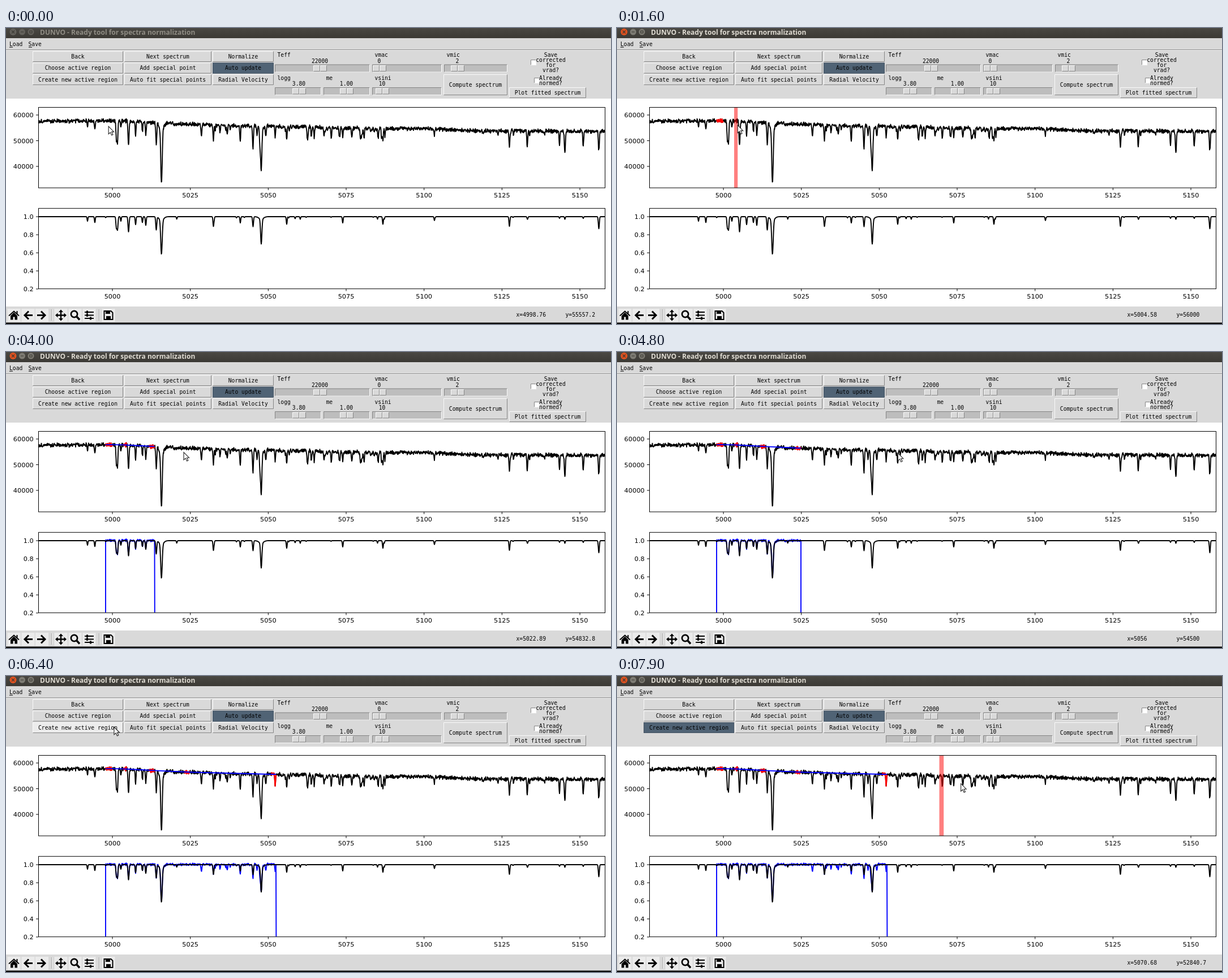
An HTML page that plays this animation: 1069 by 524 pixels, repeating every 8000 ms.

```html
<!DOCTYPE html>
<html lang="en">
<head>
<meta charset="utf-8">
<title>Spectra normalization</title>
<style>
html, body { margin: 0; width: 100%; height: 100%; overflow: hidden; background: #fff; }
svg { display: block; width: 100vw; height: 100vh; }
text { font: 9.7px "DejaVu Sans Mono", monospace; fill: #000; white-space: pre; }
.tick { font: 11.3px "DejaVu Sans", sans-serif; }
.title { font: bold 12px "Open Sans", sans-serif; fill: #dfdbd2; }
.line { fill: none; stroke: #000; stroke-width: 1.9; stroke-linejoin: round; }
.blue { stroke: #00f; }
.red { stroke: #f00; stroke-width: 2.2; }
.axis { fill: none; stroke: #000; stroke-width: 1; }
.knob { fill: #7d7b73; }
.close { fill: #e2521f; }
.idle .title { fill: #8f8c84; }
.idle .knob { fill: #63615b; }
.face { fill: #d9d9d9; }
.lit, .dim { fill: none; stroke: #fafafa; }
.dim { stroke: #858585; }
.over .face { fill: #ececec; }
.on .face { fill: #506375; }
.on .lit, .on .dim { stroke: #445464; }
</style>
</head>
<body>
<svg id="stage" viewBox="0 0 1069 524" preserveAspectRatio="none"></svg>
<script>
const LOOP = 8000, STEP = 100;

// Linear interpolation through rows [at, a, b, ...]; returns column col.
function mix(rows, at, col = 1) {
  if (at <= rows[0][0]) return rows[0][col];
  for (let i = 1; i < rows.length; i++) {
    const p = rows[i - 1], q = rows[i];
    if (at <= q[0]) return p[col] + (q[col] - p[col]) * (at - p[0]) / (q[0] - p[0]);
  }
  return rows[rows.length - 1][col];
}

let seed = 20177;
function rand() {
  seed = (seed * 1664525 + 1013904223) % 4294967296;
  return seed / 4294967296;
}

// ---- data scales
const waveX = w => 188 + (w - 5000) * 5.507;
const fluxY = f => 154 + (60000 - f) * 0.00455;
const normY = n => 334 + (1 - n) * 160;
const RATIO = 0.61; // lower plot height per upper plot height

// ---- spectra in pixels
const continuum = [[57, 165], [200, 164], [300, 169.3], [400, 172.8], [500, 174.5],
  [650, 178], [750, 178.3], [830, 182], [1059, 183]];
const level = x => mix(continuum, x);

// Strong lines: position, depth.
const strong = [
  [144, 13], [157, 17], [195, 32], [197, 38], [203, 13], [216.5, 44], [229, 23], [241, 17], [247, 25],
  [265.5, 38], [274.7, 98], [366.5, 28], [414, 18], [436.5, 29], [451, 72], [496, 22], [595, 18],
  [666, 22], [757, 11], [889.5, 28], [921, 26], [978, 25], [987.5, 39], [1020, 26], [1047.5, 35]];
// The model hardly shows the lines in this gap.
const modelled = strong.map(([x, d]) => [x, d * (x > 900 && x < 1040 ? 0.12 : RATIO)]);

function weak(n, from, to, depth) {
  return Array.from({ length: n }, () => [from + rand() * (to - from), depth * (0.2 + 0.8 * rand() ** 2)]);
}
const observedLines = [...strong, ...weak(42, 325, 680, 21), ...weak(8, 800, 980, 12)];
const modelLines = [...modelled, ...weak(18, 100, 1000, 5)];

const bell = (d, s) => Math.exp(-d * d / (2 * s * s));
function absorb(lines, x, widen, deep) {
  let sum = 0;
  for (const [at, depth] of lines) {
    const d = x - at;
    sum += depth * bell(d, 0.6 + depth * widen);
    if (depth > deep) sum += depth * 0.1 * bell(d, 4);
  }
  return sum;
}

const observed = [], model = [];
for (let x = 57.5; x <= 1058.5; x += 0.5) {
  const noise = (rand() + rand() - 1) * 4.2;
  observed.push([x, level(x) + noise + absorb(observedLines, x, 0.007, 60)]);
  model.push([x, 334 + absorb(modelLines, x, 0.012, 40)]);
}
const path = pts => pts.length ? 'M' + pts.map(p => p[0].toFixed(2) + ' ' + p[1].toFixed(2)).join('L') : '';
const slice = (a, b) => observed.filter(p => p[0] >= a && p[0] <= b);

// ---- regions dragged out with the pointer
const regions = [
  [400, 900, 1200, 4997.82, 4999.96, 56281.6],
  [1400, 1600, 1800, 5003.45, 5004.58, 56000],
  [3400, 3700, 3800, 5011.62, 5013.58, 55300],
  [4200, 4500, 4600, 5022.89, 5024.88, 54600],
  [5300, 5800, 5900, 5050.99, 5052.55, 53565.1],
  [7500, 7700, Infinity, 5069.28, 5070.68, 52840.7]
].map(([start, end, release, from, to, flux]) =>
  ({ start, end, release, from, to, flux, left: waveX(from), right: waveX(to) }));

// Pointer stops between the drags: time, wavelength, flux.
const stops = [
  [0, 4998.76, 55557.2], [2000, 5004.58, 56000], [2400, 5011.2, 55738.3], [3200, 5011.2, 55738.3],
  [4000, 5022.89, 54832.8], [4800, 5056, 54500], [5100, 5051, 53565.1], [6100, 5027.6, 66200],
  [6400, 5000.54, 74000], [6600, 5000.54, 74000], [7000, 5058.6, 53300], [7100, 5058.6, 53300],
  [7900, 5076.2, 51980]];
const moves = stops.concat(regions.flatMap(r =>
  [[r.start, r.from, r.flux], [r.end, r.to, r.flux], [r.release, r.to, r.flux]]))
  .filter(m => m[0] < LOOP).sort((a, b) => a[0] - b[0]);
const STUCK = 7700; // the readout freezes here
const CLICK = 6600;

// ---- static markup
const text = (x, y, s, anchor = 'middle', cls = '') =>
  `<text x="${x}" y="${y}" text-anchor="${anchor}" class="${cls}">${s}</text>`;
const rect = (x, y, w, h, fill, more = '') =>
  `<rect x="${x}" y="${y}" width="${w}" height="${h}" fill="${fill}" ${more}/>`;
const draw = (d, w, colour = '#000') => `<path d="${d}" fill="none" stroke="${colour}" stroke-width="${w}"/>`;
const fill = d => `<path d="${d}"/>`;

// Box with a light and a dark edge; a sunk box swaps them and takes its own colour.
function bevel(x, y, w, h, sunk) {
  const l = x + .5, t = y + .5, r = x + w - .5, b = y + h - .5;
  const [first, second] = sunk ? ['dim', 'lit'] : ['lit', 'dim'];
  return rect(x, y, w, h, sunk, sunk ? '' : 'class="face"') +
    `<path class="${first}" d="M${l} ${b}V${t}H${r}"/><path class="${second}" d="M${l} ${b}H${r}V${t}"/>`;
}

const columns = [
  [47, 160, 'Back', 'Choose active region', 'Create new active region'],
  [209, 154, 'Next spectrum', 'Add special point', 'Auto fit special points'],
  [365, 108, 'Normalize', 'Auto update', 'Radial Velocity']];
const buttons = columns.flatMap(([x, w, ...labels]) =>
  labels.map((label, row) => ({ label, x, y: 41 + row * 20.5, w, h: 19 })));
buttons.push({ label: 'Compute spectrum', x: 773, y: 82, w: 113, h: 37 },
  { label: 'Plot fitted spectrum', x: 889, y: 105, w: 136, h: 19 });

// label, value, trough x, width, handle offset
const sliders = [
  [['Teff', '22000', 475, 168, 68], ['vmac', '0', 647, 123, 1], ['vmic', '2', 774, 112, 12]],
  [['logg', '3.80', 475, 82, 31], ['me', '1.00', 561, 82, 29], ['vsini', '10', 647, 123, 6]]];

function windowFrame() {
  const knob = (x, r, cls = '') => `<circle class="knob ${cls}" cx="${x}" cy="7" r="${r}"/>`;
  return rect(0, 0, 1069, 18, 'url(#bar)') +
    knob(12.5, 6, 'close') + knob(28.5, 5.5) + knob(44, 5.5) +
    draw('M10 4.5l5 5m0-5l-5 5M26 7h5M42 5h4v4h-4z', 1.2, '#3a3833') +
    text(60, 11.5, 'DUNVO - Ready tool for spectra normalization', 'start', 'title') +
    rect(0, 18, 1069, 107, '#d9d9d9') + rect(0, 38, 1069, 1, '#8c8c8c') + rect(0, 39, 1069, 1, '#f4f4f4') +
    text(6, 32, 'Load', 'start') + text(39.5, 32, 'Save', 'start') +
    rect(6, 33.5, 6, 1, '#000') + rect(40, 33.5, 6, 1, '#000');
}

function controls() {
  let s = buttons.map(({ label, x, y, w, h }) =>
    `<g class="button">${bevel(x, y, w, h)}${text(x + w / 2, y + h / 2 + 3.3, label)}</g>`).join('');
  sliders.forEach((row, r) => row.forEach(([label, value, x, w, offset]) => {
    const y = r * 40.5 + 64.5, hx = x + offset;
    s += text(x + 4.5, y - 13.5, label, 'start') + text(hx + 11.5, y - 2.7, value) +
      bevel(x, y, w, 14, '#bdbdbd') + bevel(hx, y + 1.5, 12, 11) + bevel(hx + 12, y + 1.5, 12, 11);
  }));
  s += bevel(927, 56, 10, 10, '#fff') + bevel(933, 88, 10, 10, '#fff');
  ['Save', 'corrected', 'for', 'vrad?'].forEach((word, i) => s += text(962.5, 50.5 + i * 9, word));
  ['Already', 'normed?'].forEach((word, i) => s += text(962.5, 92 + i * 9, word));
  return s;
}

function axes() {
  let s = '<rect class="axis" x="57.5" y="140.5" width="1001" height="142.5"/>' +
    '<rect class="axis" x="57.5" y="319.300" width="1001" height="142.400"/>'.replace(/00"/g, '"');
  const tick = d => `<path class="axis" d="${d}"/>`;
  for (let w = 5000; w <= 5150; w += 25) {
    for (const y of [283, 461.7])
      s += tick(`M${waveX(w)} ${y}v4`) + text(waveX(w), y + 17, w, 'middle', 'tick');
  }
  const side = (y, label) => s += tick(`M57 ${y}h-4`) + text(48.8, y + 4.2, label, 'end', 'tick');
  for (let f = 40000; f <= 60000; f += 10000) side(fluxY(f), f);
  for (let n = 2; n <= 10; n += 2) side(normY(n / 10), (n / 10).toFixed(1));
  return s;
}

function toolbar() {
  let s = rect(0, 493, 1069, 29, '#d9d9d9') + rect(0, 521.5, 1069, 2.5, '#0c0c0c');
  for (const x of [14, 39, 63.5, 97, 122, 147, 181]) s += rect(x - 11.5, 497, 23, 23, '#ebebeb');
  for (const x of [80, 164]) s += rect(x, 498, 1, 20, '#a8a8a8') + rect(x + 1, 498, 1, 20, '#f2f2f2');
  const at = (x, shape, flip = 1) => `<g transform="translate(${x} 508.5) scale(${flip} 1)">${shape}</g>`;
  const arrow = draw('M8 0H-6M1-7L-6 0L1 7', 3);
  const tip = fill('M0-10l4 4.5h-8zM0 10l4-4.5h-8zM-10 0l4.5-4v8zM10 0l-4.5-4v8z');
  const knobs = [[-5, -8], [-12 + 7, -2.5], [1, 3]].map(([x, y]) => rect(x, y, 3, 5, '#000')).join('');
  return s +
    at(14, fill('M-6 1l6-6l6 6v7h-4.5v-5h-3v5h-4.5z') + draw('M-9 1L0-7L9 1M5.500-7.500v5', 2)) +
    at(39, arrow) + at(63, arrow, -1) +
    at(97, tip + draw('M0-7V7M-7 0H7', 2.4)) +
    at(122, '<circle cx="-1.5" cy="-2" r="5.6" fill="none" stroke="#000" stroke-width="2.6"/>' + draw('M2.5 2l5.5 6', 3.4)) +
    at(147, draw('M-8-5.5H8M-8 0H8M-8 5.5H8', 1.8) + knobs) +
    at(181, draw('M-7.500-7.500h12l3 3v12h-15z', 2) + rect(-5, -7.5, 8, 5, '#000') + rect(-4, 1.5, 8, 5, '#000'));
}

const stage = document.getElementById('stage');
stage.innerHTML =
  '<defs><linearGradient id="bar" x2="0" y2="1"><stop stop-color="#4a4843"/><stop offset="1" stop-color="#3b3934"/></linearGradient></defs>' +
  rect(0, 0, 1069, 524, '#fff') + windowFrame() + controls() +
  `<path class="line" d="${path(observed)}"/><path id="picked" class="line red"/><path id="fit" class="line blue"/>` +
  `<path id="ratio" class="line blue"/><path class="line" d="${path(model)}"/>` +
  rect(0, 140.5, 0, 142.5, '#f00', 'id="band" fill-opacity=".5"') + axes() + toolbar() +
  text(901.5, 510.5, '', 'start', 'rx') + text(988.5, 510.5, '', 'start', 'ry') +
  '<path id="pointer" d="M0 0V13.5L3.2 10.6L5.5 15.6L7.8 14.5L5.5 9.7H9.5Z" fill="#fff" stroke="#222" stroke-width="1.1"/>';

const get = id => document.getElementById(id);
const readX = stage.querySelector('.rx'), readY = stage.querySelector('.ry');
const faces = stage.querySelectorAll('.button');
const sixDigits = v => String(+v.toPrecision(6));

// Curves after n finished regions; the fit joins the continuum at their edges.
function curves(n) {
  const done = regions.slice(0, n);
  const picked = done.map(r => path(slice(r.left, r.right))).join('');
  if (n < 2) return { picked, fit: '', ratio: '' };
  const fit = done.flatMap(r => [r.left, r.right]).map(x => [x, level(x)]);
  const a = regions[0].left, b = done[n - 1].right;
  const ratio = slice(a, b).map(([x, y]) => [x, 333.5 + (y - mix(fit, x)) * RATIO]);
  return { picked, fit: path(fit), ratio: path([[a, 461], ...ratio, [b, 461]]) };
}

let shown = -1;
function render(t) {
  const x = waveX(mix(moves, t, 1)), y = fluxY(mix(moves, t, 2));
  stage.classList.toggle('idle', t < 100);
  get('pointer').setAttribute('transform', `translate(${x.toFixed(2)} ${y.toFixed(2)})`);

  const inside = y > 140.5 && y < 283, rt = Math.min(t, STUCK);
  readX.textContent = inside ? 'x=' + sixDigits(mix(moves, rt, 1)) : '';
  readY.textContent = inside ? 'y=' + sixDigits(mix(moves, rt, 2)) : '';

  const count = regions.filter(r => t >= r.release).length;
  if (count !== shown) {
    for (const [id, d] of Object.entries(curves(count))) get(id).setAttribute('d', d);
    shown = count;
  }

  const drag = regions.find(r => t >= r.start && t < r.release);
  get('band').setAttribute('x', drag ? drag.left : 0);
  get('band').setAttribute('width', drag ? Math.max(0, Math.min(x, drag.right) - drag.left) : 0);

  buttons.forEach((b, i) => {
    const on = b.label === 'Auto update' || (b.label.startsWith('Create') && t >= CLICK);
    const over = x >= b.x && x <= b.x + b.w && y >= b.y && y <= b.y + b.h;
    faces[i].classList.toggle('on', on);
    faces[i].classList.toggle('over', over && !on);
  });
}

function frame(now) {
  render(Math.floor((now % LOOP) / STEP) * STEP);
  requestAnimationFrame(frame);
}
render(0);
requestAnimationFrame(frame);
</script>
</body>
</html>
```
